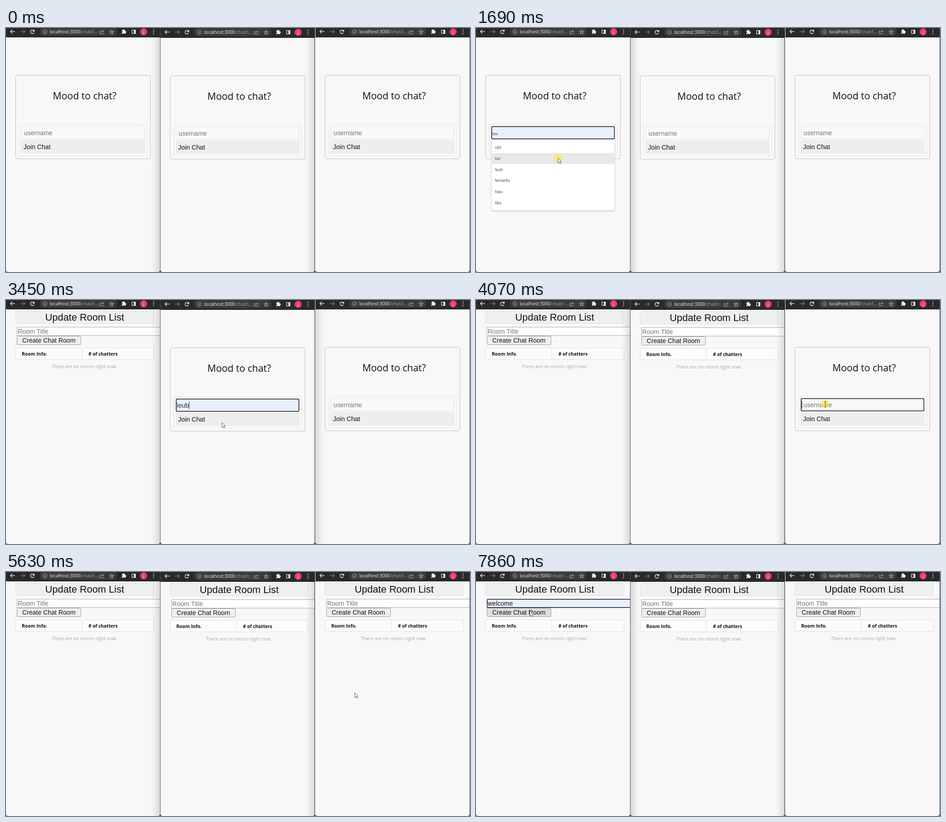
Recreate the animation shown at these times as an HTML page with a canvas. Size 1030 by 544 pixels, loop 8 s.

```html
<!DOCTYPE html>
<html lang="en">
<head>
<meta charset="utf-8">
<title>Chat rooms</title>
<style>
html, body { margin: 0; width: 100%; height: 100%; overflow: hidden; background: #f8f8f8; }
canvas { display: block; }
</style>
</head>
<body>
<canvas id="stage" width="1030" height="544"></canvas>
<script>
const ctx = document.getElementById('stage').getContext('2d');
const W = 1030, H = 544, LOOP = 8000;
const UI = '"Open Sans", "Noto Sans", sans-serif';
const FORM = '"Liberation Sans", Arial, sans-serif';
const USERS = ['ubz', 'tuv', 'leub', 'fentarilu', 'lopu', 'libu'];
const TITLES = ['welcome', 'hello', 'test'];
const ROW = 24.7;

// Each window: position, then the moments of its steps
const windows = [
  { x: 0, y: 0, focus: 890, open: 1000, pick: 1760, join: 2080, user: 1 },
  { x: 343, y: 1, focus: 2700, open: 2750, pick: 3150, join: 3680, user: 2 },
  { x: 687, y: 0, focus: 4050, open: 4210, pick: 4700, join: 5090, user: 4 }
];
const room = { focus: 6520, open: 6660, pick: 7330 };

// A press comes shortly before the page reacts to it
const PRESS = 80;
const presses = [...windows, room]
  .flatMap(s => [s.focus, s.pick, s.join ?? LOOP * 2])
  .map(t => t - PRESS);

// Pointer stops: arrival time, x, y
const stops = [
  [330, 946, 534],
  [820, 180, 228], [1410, 182, 290], [1940, 178, 267],
  [2570, 423, 238], [2990, 470, 316], [3310, 478, 279], [3540, 480, 270],
  [3980, 775, 232], [4490, 770, 360], [4960, 774, 269],
  [6450, 112, 70], [7130, 108, 98], [7510, 119, 87]
];

function pointer(t) {
  if (t < stops[0][0]) return null;
  const i = stops.findIndex(s => s[0] > t);
  if (i < 0) return { x: stops.at(-1)[1], y: stops.at(-1)[2] };
  const [t0, x0, y0] = stops[i - 1], [t1, x1, y1] = stops[i];
  const travel = Math.min(t1 - t0, 220 + 0.55 * Math.hypot(x1 - x0, y1 - y0));
  const u = Math.max(0, 1 - (t1 - t) / travel), e = u * u * (3 - 2 * u);
  return { x: x0 + (x1 - x0) * e, y: y0 + (y1 - y0) * e };
}

function activeWindow(t) {
  if (t >= room.focus - PRESS) return 0;
  const i = windows.findLastIndex(w => t >= w.focus - PRESS);
  return i < 0 ? 2 : i;
}

function text(s, x, y, size, color, family = UI, weight = 400, align = 'left') {
  ctx.font = `${weight} ${size}px ${family}`;
  ctx.fillStyle = color;
  ctx.textAlign = align;
  ctx.fillText(s, x, y);
  return ctx.measureText(s).width;
}

function box(x, y, w, h, r, fill, stroke, lw = 1) {
  ctx.beginPath();
  ctx.roundRect(x + lw / 2, y + lw / 2, w - lw, h - lw, r);
  if (fill) { ctx.fillStyle = fill; ctx.fill(); }
  if (stroke) { ctx.strokeStyle = stroke; ctx.lineWidth = lw; ctx.stroke(); }
}

function rect(x, y, w, h, color) {
  ctx.fillStyle = color;
  ctx.fillRect(x, y, w, h);
}

function line(color, lw, ...pts) {
  ctx.beginPath();
  pts.forEach(([x, y]) => ctx.lineTo(x, y));
  ctx.strokeStyle = color;
  ctx.lineWidth = lw;
  ctx.stroke();
}

function shape(color, ...pts) {
  ctx.beginPath();
  pts.forEach(([x, y]) => ctx.lineTo(x, y));
  ctx.closePath();
  ctx.fillStyle = color;
  ctx.fill();
}

function arc(x, y, r, color, lw, from = 0, to = 7) {
  ctx.beginPath();
  ctx.arc(x, y, r, from, to);
  ctx.strokeStyle = ctx.fillStyle = color;
  ctx.lineWidth = lw;
  if (lw) ctx.stroke();
  else ctx.fill();
}

function caret(x, y, since, t) {
  if ((t - since) % 1060 < 530) rect(x, y, 1, 16, '#222');
}

function arrow(x, dir, color) {
  line(color, 1.4, [x - 5 * dir, 8], [x + 5 * dir, 8]);
  line(color, 1.4, [x + dir, 3.8], [x + 5.2 * dir, 8], [x + dir, 12.2]);
}

function toolbar(page) {
  rect(0, -2, 344, 23, '#292929');
  arrow(15, -1, '#e8e8e8');
  arrow(37, 1, '#777');
  arc(58.5, 8.5, 4, '#e8e8e8', 1.5, 0.4, 5.5);
  shape('#e8e8e8', [63.5, 3], [63.5, 8], [58.8, 8]);

  box(74, -2, 173, 20, 9.5, '#3b3b3b');
  arc(86.5, 8.5, 4.3, '#c4c4c4', 1);
  rect(86, 6, 1, 1, '#c4c4c4');
  rect(86, 8, 1, 3, '#c4c4c4');
  const w = text('localhost:3000', 97, 12, 10.1, '#f4f4f4');
  text(`/chat/${page}...`, 97 + w, 12, 10.1, '#a4a4a4');

  // share and star
  line('#b4b4b4', 1, [210, 6.5], [208, 6.5], [208, 13], [216, 13], [216, 11]);
  line('#b4b4b4', 1, [210.5, 10.5], [211.5, 7.5], [216.5, 7]);
  line('#b4b4b4', 1, [214, 4.5], [217, 7], [214, 9.5]);
  const star = Array.from({ length: 11 }, (_, i) => {
    const r = i % 2 ? 2.1 : 4.9, a = i * Math.PI / 5 - Math.PI / 2;
    return [234.5 + r * Math.cos(a), 9 + r * Math.sin(a)];
  });
  line('#d4d4d4', 1, ...star);

  // extensions, side panel, profile, menu
  rect(257, 5, 8, 8, '#eee');
  arc(261, 4.5, 1.8, '#eee');
  arc(265.3, 9, 1.8, '#eee');
  arc(257.3, 9, 1.4, '#292929');
  arc(261, 13, 1.4, '#292929');
  box(279, 4, 9, 9, 0.5, null, '#eee', 1.3);
  rect(284, 4, 4, 9, '#eee');
  arc(305.5, 8.5, 7.8, '#ec3b75');
  text('j', 305.5, 11.5, 9.5, '#fff', UI, 400, 'center');
  for (let i = -1; i <= 1; i++) arc(327.5, 8.5 + i * 4.3, 1.1, '#eee');
}

function menu(x, y, w, items, hover) {
  ctx.save();
  ctx.shadowColor = 'rgba(0,0,0,.3)';
  ctx.shadowBlur = 3;
  ctx.shadowOffsetY = 1;
  box(x, y, w, 11 + items.length * ROW, 2, '#fff');
  ctx.restore();
  items.forEach((s, i) => {
    const top = y + 6 + i * ROW;
    if (i === hover) rect(x, top, w, ROW, '#e8e8e8');
    text(s, x + 8, top + 15.3, 8.4, '#333');
  });
}

function rowAt(p, x, y, w, n) {
  if (!p || p.x < x || p.x > x + w) return -1;
  const i = Math.floor((p.y - y - 6) / ROW);
  return i < n ? Math.max(i, -1) : -1;
}

function loginPage(win, t, p) {
  const focused = t >= win.focus, picked = t >= win.pick;
  const opened = t >= win.open && !picked;
  const hover = opened ? rowAt(p, 34, 248, 274, USERS.length) : -1;
  const blue = picked || hover >= 0;

  box(21, 105, 300, 187, 3.5, '#f8f8f8', '#bebebe');
  text('Mood to chat?', 104, 159, 21.3, '#111');
  box(29, 214, 285, 71, 4, null, '#e4e4e4');
  if (focused) box(34, 219, 274, 29, 2.5, blue ? '#e8f0fe' : '#f8f8f8', '#151515', 1.5);
  else box(34, 219, 274, 29, 2, '#f9f9f9', '#e2e2e2');
  box(34, 251, 274, 28, 2, '#eee', '#e2e2e2');
  text('Join Chat', 39, 270, 14.2, '#111', FORM);

  if (picked) {
    const w = text(USERS[win.user], 36, 239, 14.2, '#333', FORM);
    caret(Math.round(36 + w), 226, win.pick, t);
  } else {
    if (hover >= 0) text(USERS[hover], 36, 238.5, 8.4, '#222');
    else text('username', 40, 239, 14.2, '#757575', FORM);
    if (focused) caret(36, 226, win.focus, t);
  }
  if (opened) menu(34, 248, 274, USERS, hover);
}

function roomPage(first, t, p) {
  const focused = first && t >= room.focus, picked = first && t >= room.pick;
  const opened = first && t >= room.open && !picked;
  const hover = opened ? rowAt(p, 24, 80, 133, TITLES.length) : -1;
  const blue = picked || hover >= 0;

  box(21, 24, 308, 29, 2, '#eeeff0', '#e2e2e2');
  text('Update Room List', 87, 46, 21.9, '#111', FORM);
  if (focused) box(24, 60, 340, 20, 2, blue ? '#e8f0fe' : '#fff', '#151515', 1.5);
  else box(24, 60, 340, 20, 0, '#fff', '#a8a8a8');

  if (picked) {
    text('welcome', 26, 75, 14.2, '#111', FORM);
    caret(82, 62, room.pick, t);
  } else {
    if (hover >= 0) text(TITLES[hover], 26, 73, 8.4, '#222');
    else text('Room Title', 26, 75, 14.2, '#757575', FORM);
    if (focused) caret(26, 62, room.focus, t);
  }

  const over = first && !opened && p && p.x > 24 && p.x < 167 && p.y > 80 && p.y < 99;
  box(24, 80, 143, 20, 2, over ? '#dedede' : '#efefef', '#9a9a9a');
  text('Create Chat Room', 36, 95, 14.2, '#111', FORM);

  box(21, 106, 308, 27, 0, '#fbfbfb', '#e0e0e0');
  rect(168, 106, 1, 27, '#e0e0e0');
  text('Room Info.', 35, 124, 10.4, '#111', UI, 700);
  text('# of chatters', 183, 124, 10.2, '#111', UI, 700);
  text('There are no rooms right now.', 101, 151.5, 10.35, '#a8a8a8');
  if (opened) menu(24, 80, 133, TITLES, hover);
}

function drawWindow(win, i, t, cursor) {
  const joined = t >= win.join;
  const p = cursor && { x: cursor.x - win.x, y: cursor.y - win.y };
  ctx.save();
  ctx.beginPath();
  ctx.rect(win.x, 0, 343, H);
  ctx.clip();
  ctx.translate(win.x, win.y);
  toolbar(joined ? 'r' : 'l');
  if (joined) roomPage(i === 0, t, p);
  else loginPage(win, t, p);
  ctx.restore();
}

function shadow(edge, dir) {
  const g = ctx.createLinearGradient(edge, 0, edge + 24 * dir, 0);
  for (let i = 0; i <= 5; i++) {
    g.addColorStop(i / 5, `rgba(0,0,0,${0.14 * (1 - i / 5) ** 1.7})`);
  }
  ctx.fillStyle = g;
  ctx.fillRect(Math.min(edge, edge + 24 * dir), 21, 24, H);
}

// The front window darkens its neighbours; otherwise the right one lies on top
function drawEdges(t) {
  const active = activeWindow(t);
  windows.forEach((w, i) => {
    const right = w.x + 342;
    if (i < 2) {
      if (i === active) shadow(right + 1, 1);
      else shadow(right, -1);
    }
    rect(right, 0, 1, H, i === 1 ? '#222' : '#555');
    shape('#444', [w.x, H - 3], [w.x, H], [w.x + 3, H]);
    shape('#444', [right, H - 3], [right, H], [right - 3, H]);
  });
}

function overField(p, t) {
  return windows.some((w, i) => {
    const x = p.x - w.x, y = p.y - w.y;
    if (t < w.join) return x > 34 && x < 308 && y > 219 && y < 248;
    return i === 0 && x > 24 && x < 342 && y > 60 && y < 80;
  });
}

function drawPointer(p, t) {
  if (presses.some(c => t >= c && t < c + 190)) arc(p.x, p.y, 8.5, 'rgba(250,240,50,.72)');
  ctx.save();
  ctx.translate(Math.round(p.x), Math.round(p.y));
  if (overField(p, t)) {
    line('#444', 1, [0.5, -5], [0.5, 6]);
    for (const y of [-5.5, 6.5]) line('#444', 1, [-2, y], [3, y]);
  } else {
    const tip = [[0.5, 0.5], [0.5, 11], [2.9, 8.8], [4.6, 12.7], [6.4, 11.9], [4.7, 8.1], [8, 8]];
    shape('#fff', ...tip);
    line('#333', 0.8, ...tip, tip[0]);
  }
  ctx.restore();
}

const start = performance.now();

function draw(now) {
  const t = Math.max(0, now - start) % LOOP;
  const p = pointer(t);
  rect(0, 0, W, H, '#f8f8f8');
  windows.forEach((w, i) => drawWindow(w, i, t, p));
  drawEdges(t);
  if (p) drawPointer(p, t);
  requestAnimationFrame(draw);
}
requestAnimationFrame(draw);
</script>
</body>
</html>
```
